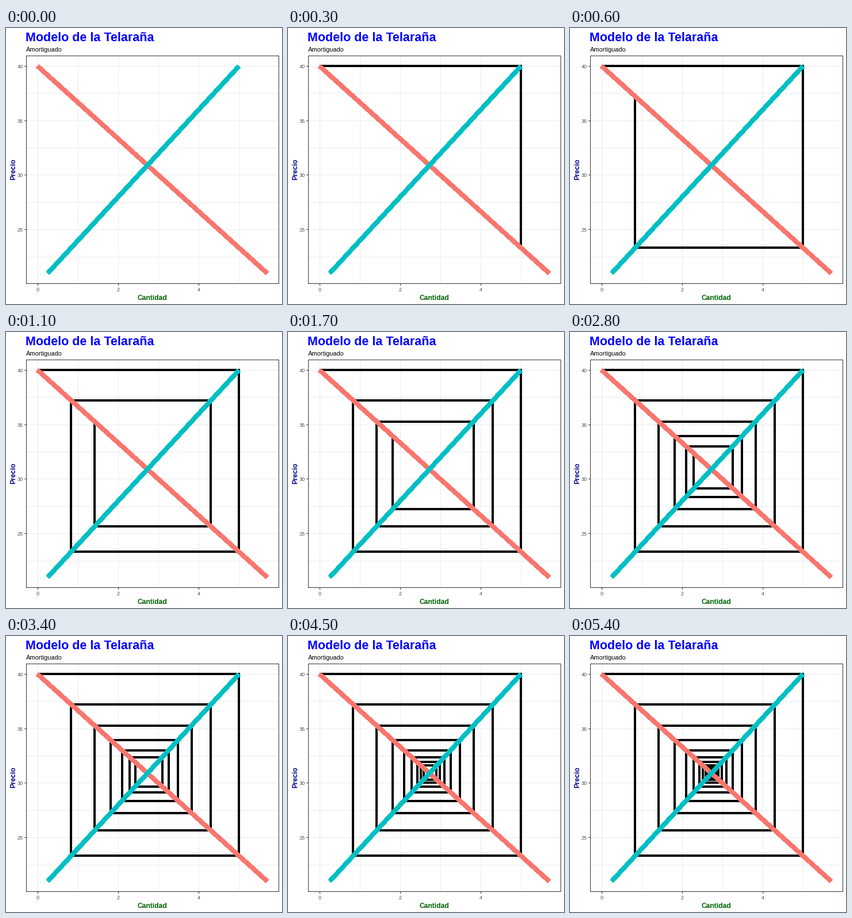
Write a matplotlib script that moves like this. It is 480 px wide and 480 px high and loops after 10000 ms.

```python
import matplotlib.pyplot as plt
from matplotlib.animation import FuncAnimation

SIZE = 480
FRAMES = 100
PERIODS = 35
LEFT, RIGHT, TOP, BOTTOM = 35, 474, 48, 444

plt.rcParams["font.family"] = "Liberation Sans"
fig = plt.figure(figsize=(SIZE / 72, SIZE / 72), dpi=72, facecolor="white")
ax = fig.add_axes([0, 0, 1, 1])
ax.set_xlim(0, SIZE)
ax.set_ylim(SIZE, 0)
ax.axis("off")


def to_x(quantity):
    return 55.1 + 70 * quantity


def to_y(price):
    return 66.4 + 18.95 * (40 - price)


def demand(quantity):
    return 40 - quantity * 10 / 3


def supply(price):
    return (price - 20) / 4


def hairline(x0, y0, x1, y1, color, zorder=1):
    ax.plot([x0 + .5, x1 + .5], [y0 + .5, y1 + .5], color=color, lw=1,
            solid_capstyle="projecting", snap=False, zorder=zorder)


def label(x, y, text, size, color, **kwargs):
    ax.text(x, y, text, fontsize=size, color=color, **kwargs)


def curve(quantities, prices, color, zorder):
    ax.plot([to_x(q) for q in quantities], [to_y(p) for p in prices],
            color=color, lw=7, solid_capstyle="butt", antialiased=False,
            zorder=zorder)


# Grid, ticks and frame
for q in range(6):
    x = int(to_x(q))
    hairline(x, TOP, x, BOTTOM, "#EBEBEB")
    if q % 2 == 0:
        hairline(x, BOTTOM + 1, x, BOTTOM + 3, "#333333")
        label(x, 458, str(q), 9, "#4D4D4D", ha="center")
for step in range(8):
    price = 40 - 2.5 * step
    y = int(to_y(price))
    hairline(LEFT, y, RIGHT, y, "#EBEBEB")
    if step % 2 == 0:
        hairline(LEFT - 3, y, LEFT - 1, y, "#333333")
        label(30, y + 4, f"{price:.0f}", 9, "#4D4D4D", ha="right")
for y in (TOP, BOTTOM):
    hairline(LEFT, y, RIGHT, y, "#333333", 5)
for x in (LEFT, RIGHT):
    hairline(x, TOP, x, BOTTOM, "#333333", 5)

# Titles
label(34.5, 23, "Modelo de la Telaraña", 21.5, "#0000FF", weight="bold")
label(35, 41, "Amortiguado", 11, "black")
label(254, 473, "Cantidad", 12, "#006400", weight="bold", ha="center")
label(16, 246, "Precio", 12, "#00008B", weight="bold", ha="center",
      rotation=90, rotation_mode="anchor")

# Demand and supply
curve([0, 5.7], [40, demand(5.7)], "#F8766D", 3)
curve([supply(21), 5], [21, 40], "#00BFC4", 4)

# Each period: produce along the price level, then the price jumps
web, = ax.plot([], [], color="black", lw=4, solid_capstyle="butt",
               solid_joinstyle="miter", antialiased=False, zorder=2)


def web_points(frame):
    quantity, price, start = 0, 40, 0
    points = [(quantity, price)]
    for period in range(1, PERIODS + 1):
        end = round((FRAMES - 1) * period / PERIODS)
        produced = supply(price)
        if frame < end:
            part = (frame - start) / (end - start)
            points.append((quantity + part * (produced - quantity), price))
            break
        points.append((produced, price))
        quantity, price, start = produced, demand(produced), end
        points.append((quantity, price))
    return points


def update(frame):
    points = web_points(frame)
    web.set_data([to_x(q) for q, _ in points], [to_y(p) for _, p in points])
    web.set_visible(frame > 0)
    return web,


anim = FuncAnimation(fig, update, frames=FRAMES, interval=100, repeat=True,
                     repeat_delay=0)
plt.show()
```
